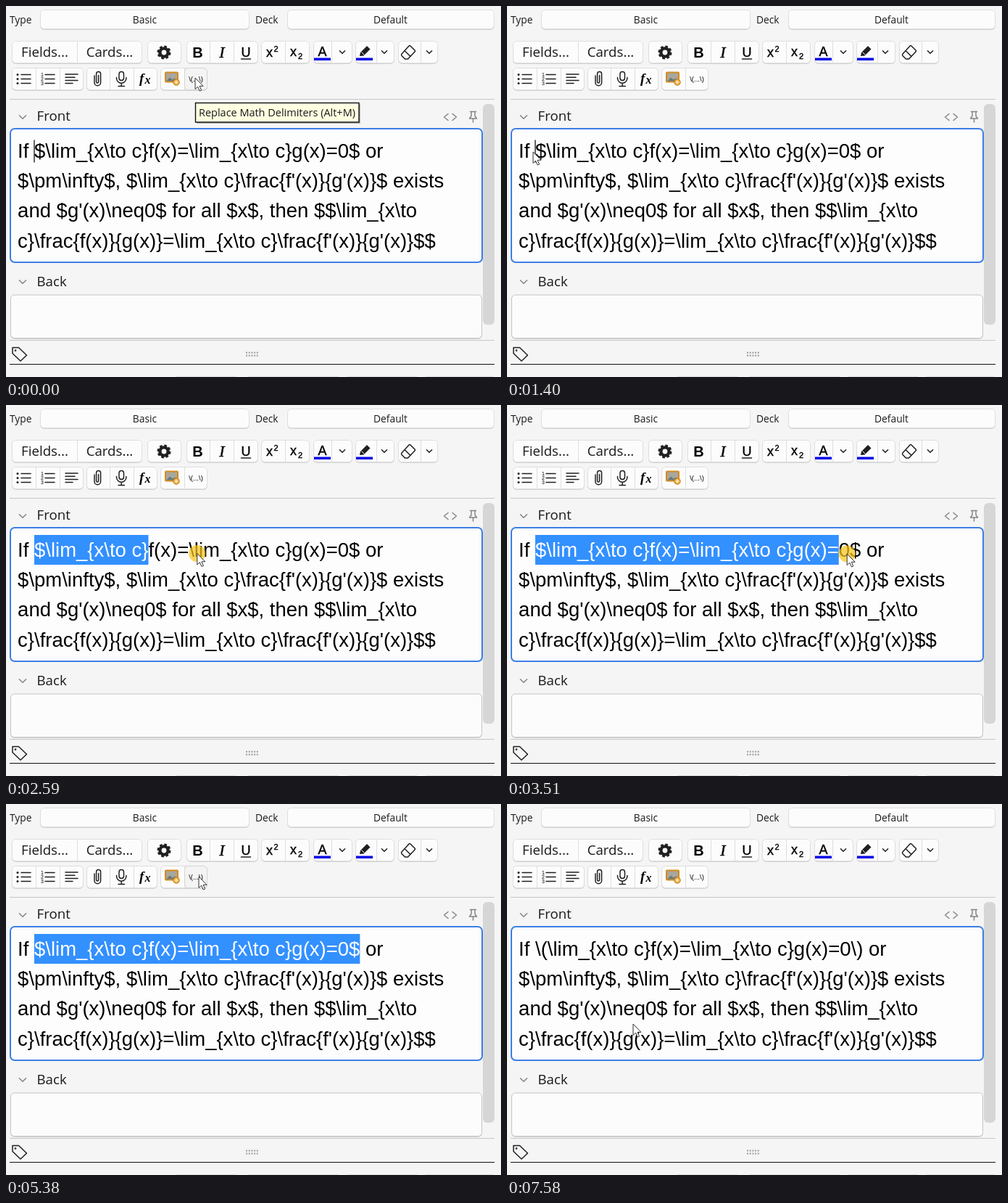
Write an HTML page that moves like this. It is 683 by 511 pixels and loops after 7990 ms.

```html
<!DOCTYPE html>
<html lang="en">
<head>
<meta charset="utf-8">
<title>Replace math delimiters</title>
<style>
  html, body { margin: 0; width: 100%; height: 100%; overflow: hidden; background: #f5f5f5; }
  svg { display: block; width: 100vw; height: 100vh; }
  text { white-space: pre; }
  .ui { font-family: "Open Sans", "Noto Sans", sans-serif; fill: #1a1a1a; }
  .edit text { font: 27.5px "Liberation Sans", Arial, sans-serif; }
  .mid { text-anchor: middle; }
  .sans { font-family: "Liberation Sans", Arial, sans-serif; }
  .serif { font-family: "Liberation Serif", Times, serif; font-style: italic; }
  .bold { font-weight: 700; }
  .thick { stroke: #000; stroke-width: .4; }
  .box { fill: #fcfcfc; stroke: #dedede; filter: drop-shadow(0 1px .6px #0002); }
  .line { fill: none; stroke: #202020; stroke-width: 1.5; stroke-linecap: round; stroke-linejoin: round; }
  .soft { stroke: #858585; }
</style>
</head>
<body>
<svg id="stage" viewBox="0 0 683 511"></svg>
<script>
const LOOP = 7990;
const stage = document.getElementById('stage');

// ---------- drawing helpers ----------
const rect = (x, y, w, h, attrs = '') => `<rect x="${x}" y="${y}" width="${w}" height="${h}" ${attrs}/>`;
const label = (x, y, size, str, cls = 'ui') =>
  `<text x="${x}" y="${y}" font-size="${size}" class="${cls}">${str}</text>`;
const line = (d, cls = '') => `<path class="line ${cls}" d="${d}"/>`;
const group = (x, y, w, ...splits) =>
  rect(x + .5, y + .5, w - 1, 30, 'rx="5" class="box"') +
  splits.map(s => `<path d="M${s + .5} ${y + 1}v29" stroke="#dedede"/>`).join('');
const chevron = (x, y, w, cls) => line(`M${x - w} ${y - w / 2}l${w} ${w} ${w} ${-w}`, cls);
const rows = (x, y, widths) => widths.map((w, i) => line(`M${x} ${y + i * 4.2}h${w}`)).join('');

// ---------- interface ----------
const selects = `
  ${label(5, 24, 13.8, 'Type')}${label(344, 24, 13.8, 'Deck')}
  ${rect(47.5, 5.5, 288, 26, 'rx="5" class="box"')}${rect(388.5, 5.5, 285, 26, 'rx="5" class="box"')}
  ${label(191.5, 24, 13.8, 'Basic', 'ui mid')}${label(530.5, 24, 13.8, 'Default', 'ui mid')}`;

const topRow = `
  ${group(8, 48, 180, 98)}${group(195, 48, 47)}${group(249, 48, 99, 281, 314)}
  ${group(352, 48, 67, 385)}${group(424, 48, 54, 449)}${group(482, 48, 54, 511)}${group(541, 48, 55, 572)}
  ${label(53.5, 70, 18.7, 'Fields...', 'ui mid')}${label(143, 70, 18.7, 'Cards...', 'ui mid')}
  <g fill="none" stroke="#202020">
    <circle cx="218" cy="64" r="5.6" stroke-width="4.4"/>
    <circle cx="218" cy="64" r="8" stroke-width="3" stroke-dasharray="3.6 2.683"/>
  </g>
  ${label(264.5, 71, 20, 'B', 'sans mid bold')}${label(298, 71, 22, 'I', 'serif mid thick')}
  ${label(331, 69.5, 18, 'U', 'sans mid thick')}${line('M324.5 73h13')}
  ${label(359, 70, 18, 'x', 'sans thick')}${label(369.5, 63, 11, '2', 'sans thick')}
  ${label(392, 69, 18, 'x', 'sans thick')}${label(403, 73, 11, '2', 'sans thick')}
  ${label(436.5, 69, 18, 'A', 'sans mid thick')}
  ${rect(425, 71.5, 23, 3.5, 'fill="#0000e6"')}${rect(483, 71.5, 23, 3.5, 'fill="#0000e6"')}
  <path d="M488 69l1-5 9-9 4.5 4.5-9 9z" fill="#202020"/>
  <path d="M490.5 63.5l4 4" stroke="#fcfcfc"/>
  ${line('M546 66l10-11q1-1 2 0l6 6q1 1 0 2l-9.5 10h-4l-4.5-4.5q-1-1 0-2.5zM550 61.5l8 8')}
  ${[464, 522, 584].map(x => chevron(x, 63.5, 3.6)).join('')}`;

const bulletRows = [94.5, 100.5, 106.5].map((y, i) =>
  `<circle cx="16" cy="${y}" r="1.5" fill="#202020"/>${line(`M21 ${y}h13M54 ${y}h13`)}
   ${label(50, y + 2.6, 7, i + 1, 'sans mid')}`).join('');

const lowRow = `
  ${group(8, 85, 99, 41, 74)}${group(111, 85, 98, 143, 176)}${group(213, 85, 65, 246)}
  ${bulletRows}${rows(82, 94, [17, 13, 17, 10])}
  ${line('M122 96v9.5a4.3 4.3 0 0 0 8.6 0v-12a3 3 0 0 0-6 0v11a1.5 1.5 0 0 0 3 0v-9')}
  ${rect(156, 90.5, 6.5, 12, 'rx="3.2" class="line"')}
  ${line('M152.500 98.500v1a6.700 6.700 0 0 0 13.400 0v-1M159.200 106.500v4M155 110.500h8.500')}
  ${label(184, 106, 19, 'f', 'serif bold')}${label(191.5, 107, 16, 'x', 'serif bold')}
  ${rect(220, 91.5, 17, 13, 'rx="1" fill="#aaa79c" stroke="#d58b1f" stroke-width="2"')}
  <path d="M221 103.500l5-5 4 3 3-2 3 4z" fill="#6c7a78"/>
  <circle cx="235" cy="105" r="4.2" fill="#f2b03a" stroke="#b97817"/>
  <path d="M232.5 105h5M235 102.5v5" stroke="#fff"/>
  ${rect(246.5, 85.5, 31, 30, 'id="hover" rx="5"')}
  ${label(262, 103.5, 9.6, '\\(...\\)', 'sans mid')}`;

const fields = `
  <path d="M5 128.5h669M5 460.5h669" stroke="#c6c6c6"/>
  ${rect(658, 135, 16, 304, 'rx="6" fill="#d6d6d6"')}
  ${chevron(23, 153, 4.6, 'soft')}${label(42.5, 157.5, 18.7, 'Front')}
  ${line('M610 148.5l-5.5 4.5 5.5 4.5M616 148.5l5.5 4.5-5.5 4.5', 'soft')}
  ${line('M640.5 145.5h8M642 145.5v6l-2.5 3.5h10l-2.5-3.5v-6M644.5 155v5', 'soft')}
  ${rect(6, 169, 651, 184, 'rx="6" fill="#fdfdfd" stroke="#3d7fe6" stroke-width="2"')}
  ${chevron(23, 380, 4.6, 'soft')}${label(42.5, 386, 18.7, 'Back')}
  ${rect(6.5, 398, 650, 59.5, 'rx="5" class="box" style="stroke:#c4c4c4"')}
  ${line('M9 470.5h8.5l11 10.5-8.5 8-11-10.5z')}
  <circle cx="13" cy="474.5" r="1.4" fill="#444"/>
  <path d="M331 477.5h17M331 481.5h17" stroke="#999" stroke-width="2" stroke-dasharray="2 1.7"/>
  <path d="M5 493.5h669" stroke="#111"/>
  <path d="M235 510.5h83M334 510.5h125M471 510.5h96M579 510.5h93" stroke="#dcdcdc"/>`;

// ---------- editor text ----------
const BEFORE = String.raw`If $\lim_{x\to c}f(x)=\lim_{x\to c}g(x)=0$ or`;
const AFTER = String.raw`If \(\lim_{x\to c}f(x)=\lim_{x\to c}g(x)=0\) or`;
const REST = [
  String.raw`$\pm\infty$, $\lim_{x\to c}\frac{f'(x)}{g'(x)}$ exists`,
  String.raw`and $g'(x)\neq0$ for all $x$, then $$\lim_{x\to`,
  String.raw`c}\frac{f(x)}{g(x)}=\lim_{x\to c}\frac{f'(x)}{g'(x)}$$`
];
const SEL_START = 3, SEL_END = BEFORE.lastIndexOf('$') + 1;
const CARET_AFTER = AFTER.lastIndexOf(')') + 1;
const textLine = (str, row, attrs = '') =>
  `<text x="16.1" y="${Math.round(208.75 + 41.25 * row)}" ${attrs}>${str}</text>`;

stage.innerHTML = `
  <defs><clipPath id="selClip">${rect(0, 179, 0, 41, 'id="clipRect"')}</clipPath></defs>
  ${rect(0, 0, 683, 511, 'fill="#f5f5f5"')}
  ${selects}${topRow}${lowRow}${fields}
  <g class="edit">
    ${textLine('', 0, 'id="first"')}
    ${REST.map((s, i) => textLine(s, i + 1)).join('')}
    <g id="selection">
      ${rect(0, 179, 0, 41, 'id="selRect" fill="#3390ff"')}
      ${textLine(BEFORE, 0, 'fill="#fff" clip-path="url(#selClip)"')}
    </g>
  </g>
  ${rect(0, 184.5, 1.2, 31, 'id="caret"')}
  <g id="tip">
    ${rect(263, 135, 226, 27, 'fill="#0004"')}
    ${rect(261.5, 133.5, 225.5, 26.5, 'fill="#ffffe1" stroke="#111" stroke-width="1.4"')}
    ${label(266, 151.5, 14.47, 'Replace Math Delimiters (Alt+M)')}
  </g>
  <g id="pointer">
    <circle id="press" r="11.5" fill="#f8c51c" opacity=".72"/>
    <path d="M0 0V15.5L3.6 12.2 6.2 18 8.6 17 6.1 11.3H11z" fill="#fff" stroke="#333"/>
  </g>`;

const el = {};
stage.querySelectorAll('[id]').forEach(n => el[n.id] = n);
const show = (node, on) => node.setAttribute('visibility', on ? 'visible' : 'hidden');
const within = (t, ...spans) => spans.some(([a, b]) => t >= a && t < b);

// ---------- motion ----------
// The screen refreshes in bursts: start time and number of 130 ms steps.
const bursts = [[0, 1], [460, 2], [740, 2], [1010, 2], [1400, 2], [1660, 2], [2060, 4], [2590, 5],
  [3250, 7], [4290, 1], [4550, 1], [4690, 3], [5090, 1], [5230, 1], [5380, 1], [5780, 1],
  [5940, 1], [6370, 2], [6640, 4], [7170, 1], [7580, 1]];
const ticks = bursts.flatMap(([t, n]) => Array.from({ length: n }, (_, i) => t + i * 130));

const DRAG_END = 4290, CLICK = 5780, RELEASE = 5940;
const LAG = 170; // the page reacts this much later than the pointer

// Hand movements: start, end, x, y
const HOME = [261, 99];
const reaches = [[400, 1270, 36, 201], [1400, 1790, 37, 204], [1930, 4030, 482, 205],
  [DRAG_END, 4550, 475, 196], [4550, 5380, 266, 100], [6240, 6370, 410, 144],
  [6370, 7170, 176, 302], [7170, 7580, 174, 303]];

// Minimum-jerk curve with a quick start and a long settling tail
function reach(u) {
  const v = Math.min(1, Math.max(0, u)) ** .59;
  return v ** 3 * (10 - 15 * v + 6 * v * v);
}

function pointerAt(t) {
  let [x, y] = HOME;
  for (const [from, to, tx, ty] of reaches) {
    const p = reach((t - from) / (to - from));
    x += (tx - x) * p;
    y += (ty - y) * p;
  }
  return [x, y];
}

const edge = i => el.first.getStartPositionOfChar(i).x;

// Character boundary nearest to x
function nearest(x) {
  let i = SEL_START;
  while (i < SEL_END && x > (edge(i) + edge(i + 1)) / 2) i++;
  return i;
}

function drawSelection(end) {
  const from = edge(SEL_START);
  for (const r of [el.selRect, el.clipRect]) {
    r.setAttribute('x', from);
    r.setAttribute('width', edge(end) - from);
  }
}

function draw(time) {
  const t = ticks.findLast(tick => tick <= time);
  const [x, y] = pointerAt(t);
  const [seenX, seenY] = pointerAt(t - LAG);
  const replaced = t >= RELEASE;

  const str = replaced ? AFTER : BEFORE;
  if (el.first.textContent !== str) el.first.textContent = str;

  el.pointer.setAttribute('transform', `translate(${x.toFixed(1)} ${y.toFixed(1)})`);
  show(el.press, within(t, [1790, DRAG_END], [CLICK, RELEASE]));

  const hover = within(seenX, [246, 278]) && within(seenY, [85, 116]);
  const active = t >= CLICK;
  show(el.hover, hover);
  show(el.tip, hover && t < LOOP / 2);
  el.hover.setAttribute('fill', active ? '#f0f0f0' : '#f4f4f4');
  el.hover.setAttribute('stroke', active ? '#b4b4b4' : '#d4d4d4');

  const dragged = within(t, [2060, RELEASE]);
  const end = dragged ? nearest(pointerAt(Math.min(t - LAG, DRAG_END))[0]) : SEL_START;
  show(el.selection, end > SEL_START);
  if (end > SEL_START) drawSelection(end);

  show(el.caret, end === SEL_START && within(t, [0, 460], [1010, 1520], [1790, RELEASE], [RELEASE, 6500]));
  el.caret.setAttribute('x', Math.round(edge(replaced ? CARET_AFTER : SEL_START)) - .6);
}

const start = performance.now();
function loop() {
  draw((performance.now() - start) % LOOP);
  requestAnimationFrame(loop);
}
loop();
</script>
</body>
</html>
```
